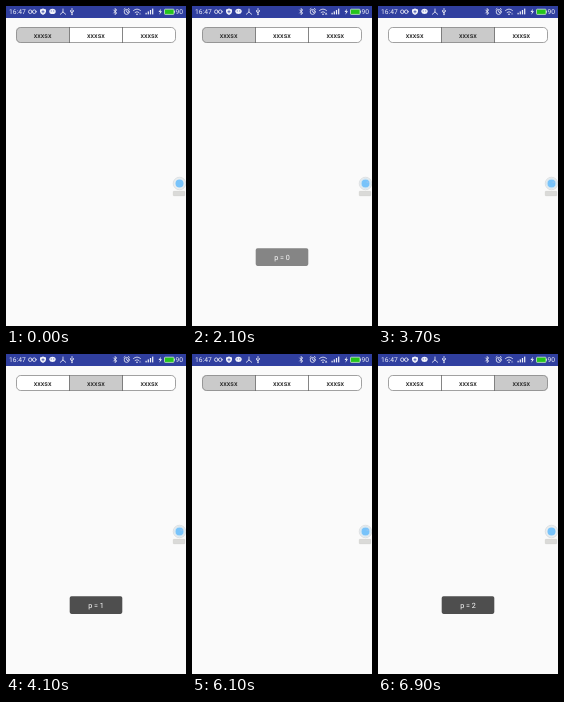
These frames come from a looping animation (180 px wide and 320 px high, 7800 ms). An HTML page:

```html
<!DOCTYPE html>
<html lang="en">
<head>
<meta charset="utf-8">
<title>Segmented control</title>
<style>
  html, body { margin: 0; width: 100%; height: 100%; overflow: hidden; background: #fafafa; }
  svg { display: block; width: 100vw; height: 100vh; }
  text { font-family: Roboto, sans-serif; text-rendering: geometricPrecision; }
  .line { fill: none; stroke: #f0f2fa; stroke-width: .8; stroke-linecap: round; stroke-linejoin: round; }
  .label { font-size: 7px; font-weight: 500; fill: #2a2a2a; text-anchor: middle; }
</style>
</head>
<body>
<svg viewBox="0 0 180 320">
  <defs>
    <clipPath id="pill"><rect x="10" y="21" width="160" height="16" rx="4.5"/></clipPath>
  </defs>
  <rect width="180" height="320" fill="#fafafa"/>

  <!-- status bar -->
  <rect width="180" height="12" fill="#303f9f"/>
  <g fill="#f0f2fa">
    <text x="3" y="8.2" font-size="6.7">16:47</text>
    <text x="169.6" y="8.2" font-size="6.7">90</text>
    <path d="M37 2.5l3 1v2.2q0 2-3 3.3q-3-1.3-3-3.3V3.5z"/>
    <ellipse cx="46.5" cy="5.4" rx="3.2" ry="2.7"/>
    <path d="M155 2.7l-2.5 3.3h1.6l-.8 2.800 2.700-3.600h-1.600z"/>
    <circle cx="66" cy="8.5" r=".7"/>
    <circle cx="131" cy="8.200" r=".8"/>
    <g id="signal"></g>
  </g>
  <g class="line">
    <circle cx="24.300" cy="5.700" r="1.800"/>
    <circle cx="28.300" cy="5.700" r="1.800"/>
    <path d="M57 3v3l-2.700 2.300M57 6l2.700 2.300"/>
    <path d="M66 8V2.500M64.500 4.500v1.300l1.500 1M67.500 4.500v1l-1.500 1"/>
    <path d="M107.700 4l3 3-1.500 1.600V2.500l1.500 1.500-3 3"/>
    <circle cx="120.700" cy="5.900" r="2.500"/>
    <path d="M120.700 4.700V6l1 .6M118 3.300l1-.8M123.400 3.300l-1-.8"/>
    <path d="M127.500 4.500q3.500-3 7 0M129.100 6.400q1.900-1.600 3.800 0"/>
  </g>
  <path id="wifi" d="M132.800 8.600l1.300-2 1.300 2z" fill="#f0f2fa"/>
  <path d="M37 4.200v3M35.500 5.700h3" stroke="#303f9f" stroke-width=".7"/>
  <path d="M45.200 5h.1M47.700 5h.1" stroke="#303f9f" stroke-width=".9" stroke-linecap="round"/>
  <rect x="158.500" y="3.200" width="9.500" height="5.200" rx=".7" fill="#25c51c" stroke="#e0f3e0" stroke-width=".7"/>
  <rect x="168" y="4.800" width=".8" height="2" fill="#e0f3e0"/>

  <!-- segments -->
  <rect x="10" y="21" width="160" height="16" rx="4.5" fill="#fff"/>
  <rect id="pick" y="21" height="16" fill="#cacaca" clip-path="url(#pill)"/>
  <rect x="10.500" y="21.500" width="159" height="15" rx="4.200" fill="none" stroke="#8a8a8a" stroke-width=".8"/>
  <path d="M63.500 21v16M116.500 21v16" stroke="#666" stroke-width=".8"/>
  <g id="labels"></g>

  <!-- floating ball -->
  <circle cx="173.500" cy="177.500" r="6.300" fill="#e9edef" stroke="#d5d9db" stroke-width=".7"/>
  <circle cx="173.500" cy="177.500" r="4" fill="#78c3fa"/>
  <g id="shade">
    <circle cx="173.500" cy="177.500" r="4.600" fill="none" stroke="#b5dcf5" stroke-width="1"/>
    <path d="M174 176l2-.8 1.200 1-2 .8z" fill="#a9c4ea"/>
  </g>
  <rect x="167.300" y="185.300" width="11.400" height="4.400" rx=".4" fill="#dadad8" stroke="#c6c6c4" stroke-width=".5"/>

  <!-- toast -->
  <g id="toast">
    <rect x="63.700" y="242.300" width="52.600" height="17.600" rx="1.800" fill="#4e4e4e"/>
    <text id="message" x="90" y="253.700" font-size="7.200" fill="#fff" text-anchor="middle"></text>
  </g>
</svg>
<script>
  const LOOP = 7800, STEP = 100;
  const WIDTH = 160 / 3;
  const FADE = 3.1; // steps from clear to solid
  const toasts = [
    { page: 0, show: 100, hide: 2100, gone: 3300 },
    { page: 1, show: 3900, hide: 5800, gone: 6100 },
    { page: 2, show: 6700, hide: LOOP, gone: LOOP }
  ];
  const el = id => document.getElementById(id);
  const set = (id, name, value) => el(id).setAttribute(name, value);
  const within = (t, from, to) => t >= from && t < to;
  const stepsSince = (t, start) => Math.floor((t - start) / STEP) + 1;
  const ramp = (t, start) => Math.min(Math.max(stepsSince(t, start), 0), 3) / FADE;

  el("labels").innerHTML = [0, 1, 2]
    .map(i => `<text class="label" x="${36.6 + i * WIDTH}" y="31.700">xxxsx</text>`).join("");
  el("signal").innerHTML = [0, 1, 2, 3]
    .map(i => `<rect x="${139.5 + i * 2.2}" y="${6.800 - i * 1.4}" width="1.200" height="${1.6 + i * 1.4}"/>`).join("");

  function selected(t) {
    if (t >= 6500) return 2;
    return within(t, 3700, 6100) ? 1 : 0;
  }

  function draw(t) {
    const i = selected(t);
    set("pick", "x", 10 + i * WIDTH);
    set("pick", "width", WIDTH);

    const toast = toasts.find(o => within(t, o.show, o.gone));
    if (toast) {
      const shown = Math.min(1, ramp(t, toast.show) * FADE / 3);
      set("toast", "opacity", shown - ramp(t, toast.hide));
      el("message").textContent = "p = " + toast.page;
    } else {
      set("toast", "opacity", 0);
    }

    const shaded = within(t, 200, 2200) || within(t, 3300, 6700);
    set("shade", "opacity", shaded ? .6 : 0);
    set("wifi", "opacity", within(t % 4000, 1100, 2200) ? .9 : .4);
  }

  const begin = performance.now();
  function tick() {
    draw((performance.now() - begin) % LOOP);
    requestAnimationFrame(tick);
  }
  tick();
</script>
</body>
</html>
```
